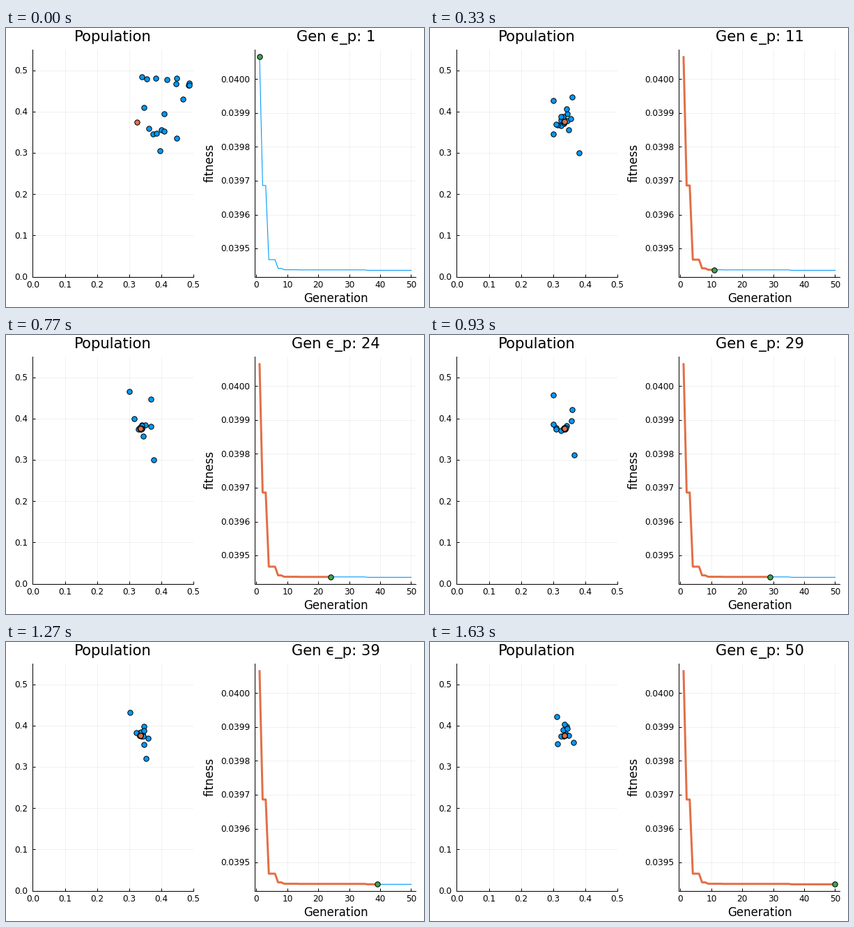
Animation, 600 px wide and 400 px high, one loop 1.66 s. Source, as a matplotlib script:

```python
import numpy as np
import matplotlib.pyplot as plt
from matplotlib.animation import FuncAnimation

W, H, PT = 600, 400, 0.72             # stage in pixels, points per pixel
TOP, BOTTOM, WIDTH = 31.4, 356.6, 230.6
LEFT, RIGHT = 38.4, 357.4             # left edges of the two panels
BLUE, ORANGE, GREEN = "#009afa", "#e26f46", "#3da44d"
GENS, SWARM = 50, 16
LOW = 0.3                             # lower bound of the search space

# Fitness reached at each improving generation
IMPROVED = {1: 0.0400676, 2: 0.0396860, 4: 0.0394670, 7: 0.0394412,
            9: 0.0394371, 14: 0.0394367, 36: 0.0394355}

# Three far particles, by their place at a few generations
STOPS = (1, 11, 18, 24, 35, 44, 50)
FAR_X = [(.339, .300, .300, .300, .300, .306, .312),
         (.486, .360, .380, .367, .350, .340, .343),
         (.396, .380, .365, .376, .354, .353, .335)]
FAR_Y = [(.484, .427, .440, .466, .448, .411, .422),
         (.464, .435, .482, .447, .394, .381, .393),
         (.306, .300, .301, .300, .328, .311, .403)]

rng = np.random.default_rng(12)
START = rng.uniform((0.345, 0.315), (0.5, 0.49), (SWARM, 2))
SPEED = rng.uniform(0.7, 1.5, (SWARM, 2))
FLOOR = 0.3 * rng.random((SWARM, 1)) ** 2


def last_gain(gen):
    return max(g for g in IMPROVED if g <= gen)


def best(gen):
    near = np.exp((1 - last_gain(gen)) / 2.5)
    return np.array([0.335, 0.377]) - near * np.array([0.010, 0.002])


def particles(gen):
    """Damped swings around the best place, plus the far particles."""
    t = gen - 1
    fade = FLOOR + (1 - FLOOR) * np.exp(-t / 6)
    near = best(gen) + (START - best(1)) * fade * np.cos(SPEED * t)
    far = [(np.interp(gen, STOPS, x), np.interp(gen, STOPS, y))
           for x, y in zip(FAR_X, FAR_Y)]
    return np.maximum(np.vstack([near, far]), LOW)


plt.rcParams["font.family"] = "DejaVu Sans"
fig = plt.figure(figsize=(W / 100, H / 100), dpi=100, facecolor="white")


def text(x, y, s, size, ha="center", va="baseline", **kw):
    return fig.text(x / W, 1 - y / H, s, fontsize=size * PT, ha=ha, va=va,
                    **kw)


def panel(left, xlim, ylim, xticks, yticks, xfmt, yfmt):
    ax = fig.add_axes([left / W, 1 - BOTTOM / H, WIDTH / W,
                       (BOTTOM - TOP) / H], facecolor="none")
    ax.set(xlim=xlim, ylim=ylim, xticks=xticks, yticks=yticks)
    ax.tick_params(direction="in", length=4 * PT, width=PT,
                   labelbottom=False, labelleft=False)
    ax.grid(color="black", alpha=0.055, lw=PT)
    ax.set_axisbelow(True)
    for side, spine in ax.spines.items():
        spine.set_visible(side in ("left", "bottom"))
        spine.set_linewidth(PT)
    for v in xticks:
        x = left + (v - xlim[0]) / (xlim[1] - xlim[0]) * WIDTH
        text(x, 372, format(v, xfmt), 12.1)
    for v in yticks:
        y = BOTTOM - (v - ylim[0]) / (ylim[1] - ylim[0]) * (BOTTOM - TOP)
        text(left - 7, y + 4.2, format(v, yfmt), 12.1, ha="right")
    return ax


def dots(ax, color, z):
    return ax.plot([], [], "o", mfc=color, mec="black", ms=7.4 * PT,
                   mew=PT, zorder=z)[0]


gens = np.arange(1, GENS + 1)
curve = np.array([IMPROVED[last_gain(g)] for g in gens])
pad = 0.03 * np.ptp(curve)

tenths = np.arange(6) / 10
pop = panel(LEFT, (0, 0.5), (0, 0.55), tenths, tenths, ".1f", ".1f")
fit = panel(RIGHT, (-0.47, 51.47), (curve.min() - pad, curve.max() + pad),
            np.arange(0, 51, 10), np.arange(395, 401) / 10000, "d", ".4f")

text(LEFT + WIDTH / 2, 19, "Population", 21.1)
title = text(RIGHT + WIDTH / 2 + 0.6, 19, "", 21.1)
text(RIGHT + WIDTH / 2 + 0.6, 393, "Generation", 16.6)
text(302, 193, "fitness", 16.6, ha="right", va="center", rotation=90)

fit.plot(gens, curve, color=BLUE, lw=1.1 * PT, zorder=3)
trail, = fit.plot([], [], color=ORANGE, lw=3 * PT, zorder=4,
                  solid_capstyle="butt")
head = dots(fit, GREEN, 5)
others = dots(pop, BLUE, 3)
leader = dots(pop, ORANGE, 4)


def draw(frame):
    gen = (3 * frame + 1) // 10 + 1  # 30 generations per second
    others.set_data(*particles(gen).T)
    leader.set_data(*best(gen)[:, None])
    trail.set_data(gens[:gen], curve[:gen])
    head.set_data([gen], [curve[gen - 1]])
    title.set_text(f"Gen \u03f5_p: {gen}")
    return others, leader, trail, head, title


anim = FuncAnimation(fig, draw, frames=166, interval=10, repeat=True,
                     repeat_delay=0)
plt.show()
```
